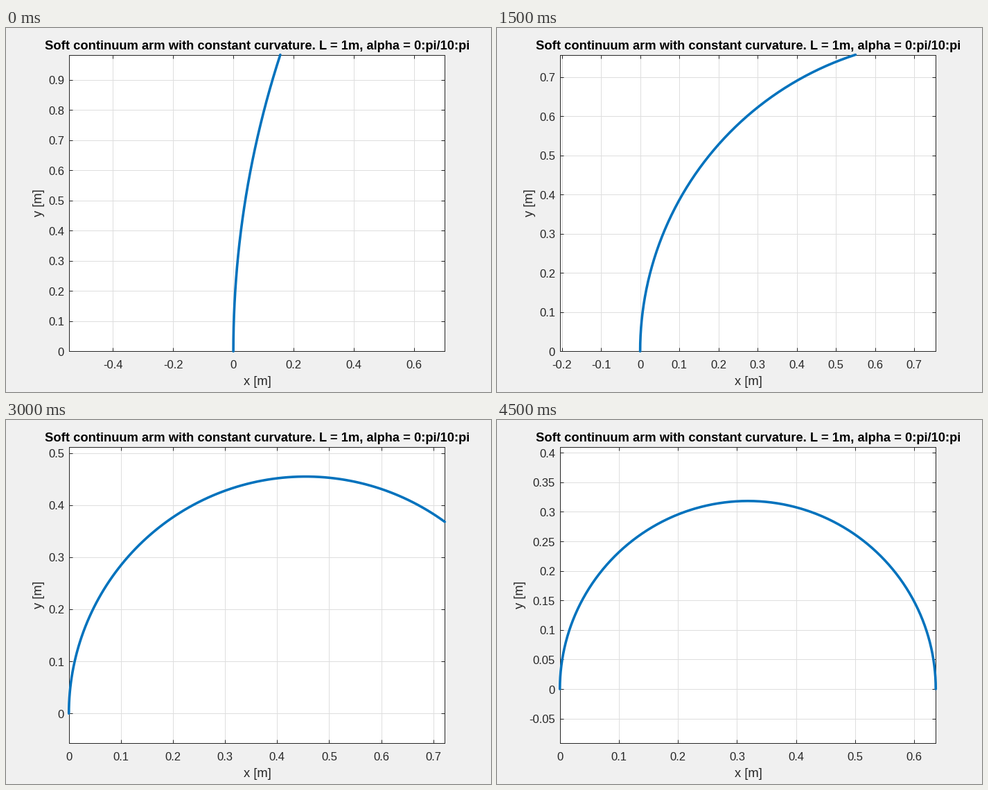
These frames come from a looping animation (700 px wide and 525 px high, 5 s). A matplotlib script:

```python
import math

import matplotlib.pyplot as plt
import numpy as np
from matplotlib.animation import FuncAnimation

W, H, DPI = 700, 525, 100
LEFT, RIGHT, TOP, BOTTOM = 90.75, 633.25, 38.55, 466.3
INK = "#262626"
FRAMES = 10


def pt(px):
    return px * 72 / DPI


plt.rcParams.update({
    "font.family": "Liberation Sans",
    "axes.linewidth": pt(1), "axes.edgecolor": INK, "axes.axisbelow": True,
    "axes.grid": True, "grid.color": "#dedede", "grid.linewidth": pt(1),
    "xtick.direction": "in", "xtick.top": True, "xtick.labelbottom": False,
    "xtick.major.size": pt(5), "xtick.major.width": pt(1), "xtick.color": INK,
    "ytick.direction": "in", "ytick.right": True, "ytick.labelleft": False,
    "ytick.major.size": pt(5), "ytick.major.width": pt(1), "ytick.color": INK,
})

fig = plt.figure(figsize=(W / DPI, H / DPI), dpi=DPI, facecolor="#f0f0f0")
ax = fig.add_axes([LEFT / W, 1 - BOTTOM / H, (RIGHT - LEFT) / W, (BOTTOM - TOP) / H])


def label(x, y, text, size=16.67, color=INK, ha="center", **kw):
    """Text at pixel x and baseline y, counted from the top left."""
    ax.text(x / W, 1 - y / H, text, transform=fig.transFigure, fontsize=pt(size),
            color=color, ha=ha, va="baseline", **kw)


def ticks(lo, hi):
    """Finest round step that needs at most eleven ticks."""
    for step in (0.05, 0.1, 0.2):
        first, last = math.ceil(lo / step - 1e-9), math.floor(hi / step + 1e-9)
        if last - first < 11:
            break
    return [round(k * step, 2) for k in range(first, last + 1)]


def draw(i):
    ax.clear()
    alpha = math.pi * (i + 1) / 10
    a = np.linspace(0, alpha, 201)
    x, y = (1 - np.cos(a)) / alpha, np.sin(a) / alpha

    # equal scale on both axes, tight around the arm and centred
    xmax, ymax = x.max(), y.max()
    scale = min((RIGHT - LEFT) / xmax, (BOTTOM - TOP) / ymax)
    w, h = (RIGHT - LEFT) / scale, (BOTTOM - TOP) / scale
    x0, y0 = (xmax - w) / 2, (ymax - h) / 2
    ax.plot(x, y, color="#0072bd", lw=pt(3.6), solid_capstyle="round",
            solid_joinstyle="round", clip_on=False, zorder=5)
    ax.set_xlim(x0, x0 + w)
    ax.set_ylim(y0, y0 + h)

    xt, yt = ticks(x0, x0 + w), ticks(y0, y0 + h)
    ax.set_xticks(xt)
    ax.set_yticks(yt)
    for v in xt:
        label(LEFT + (v - x0) * scale, 491, f"{v:g}")
    for v in yt:
        label(84, BOTTOM - (v - y0) * scale + 6.5, f"{v:g}", ha="right")

    # the y label moves out when the tick labels get wider
    widest = max((f"{v:g}" for v in yt), key=len)
    side = {3: 52, 4: 43, 5: 38}[len(widest)]
    label(side, (TOP + BOTTOM) / 2, "y [m]", 18.33, rotation=90,
          rotation_mode="anchor")
    label(362.5, 515, "x [m]", 18.33)
    label(362.5, 31, "Soft continuum arm with constant curvature. "
          "L = 1m, alpha = 0:pi/10:pi", 18.33, "black", weight="bold")
    return []


anim = FuncAnimation(fig, draw, frames=FRAMES, init_func=lambda: draw(0),
                     interval=500, repeat=True, repeat_delay=0)
plt.show()
```
